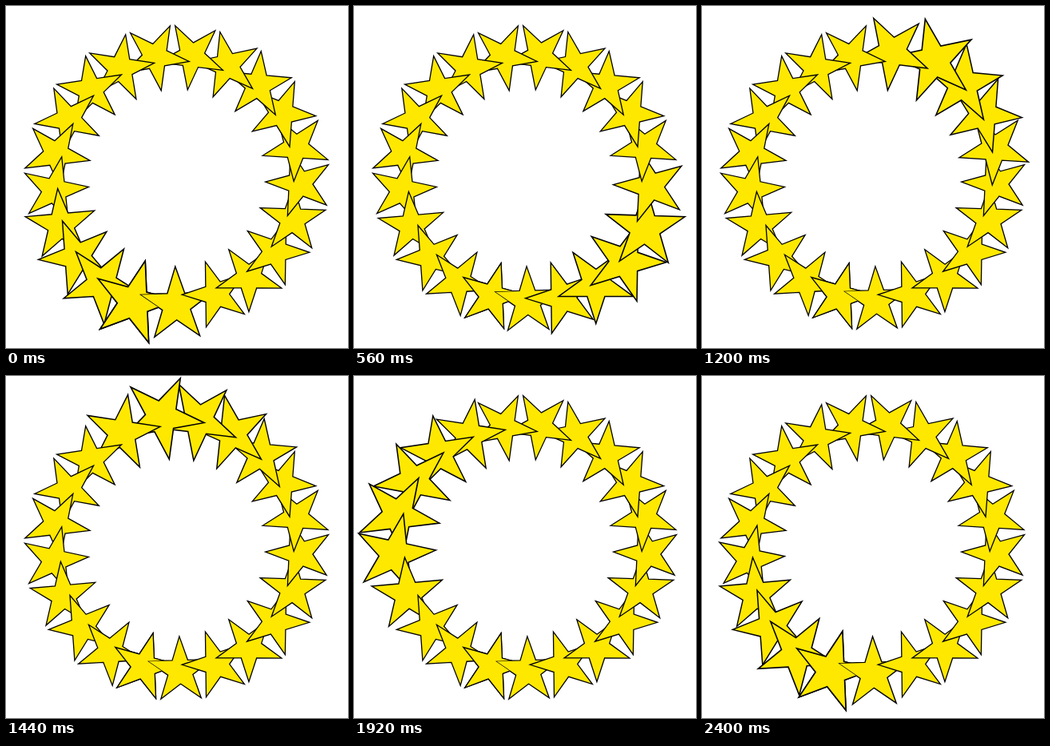
Write an HTML page with a canvas that moves like this. It is 428 px wide and 428 px high and loops after 2440 ms.

```html
<!DOCTYPE html>
<html lang="en">
<head>
<meta charset="utf-8">
<title>Star ring</title>
<style>
  html, body { margin: 0; width: 100%; height: 100%; overflow: hidden; background: #fff; }
  canvas { display: block; }
</style>
</head>
<body>
<canvas id="stage" width="428" height="428"></canvas>
<script>
const ctx = document.getElementById('stage').getContext('2d');
const SIZE = 428, LOOP = 2440, STEP = 40, COUNT = 21;
const CENTER = { x: 213.8, y: 215 };
const RING = 153.9, RADIUS = 43, INNER = RADIUS * 0.382;
const HALF_WIDTH = RADIUS * Math.sin(Math.PI * 0.4);
const GROWTH = 0.25, RISE = 240, FALL = 480;

const star = new Path2D();
for (let i = 0; i < 10; i++) {
  const angle = -Math.PI / 2 + i * Math.PI / 5;
  const r = i % 2 ? INNER : RADIUS;
  star.lineTo(r * Math.cos(angle), r * Math.sin(angle));
}
star.closePath();

// The pulse travels three steps per star and hurries a little near the end.
function startTime(k) {
  const lead = k > 15 ? 2 : k === 15 ? 1 : 0;
  return (3 * (k - 1) - lead) * STEP;
}

function scaleAt(k, time) {
  const age = (time - startTime(k) + LOOP) % LOOP;
  const pulse = Math.min(age / RISE, (RISE + FALL - age) / FALL);
  return 1 + GROWTH * Math.max(0, pulse);
}

// Each star grows from the corner of its bounding box.
function placement(k, time) {
  return new DOMMatrix()
    .translate(CENTER.x, CENTER.y)
    .rotate(-1.6 - k * 360 / COUNT)
    .translate(HALF_WIDTH, RING - RADIUS)
    .scale(scaleAt(k, time))
    .translate(-HALF_WIDTH, RADIUS);
}

function drawStar(k, time) {
  ctx.save();
  ctx.transform(...placement(k, time).toFloat64Array().filter((_, i) => [0, 1, 4, 5, 12, 13].includes(i)));
  ctx.fill(star);
  ctx.stroke(star);
  ctx.restore();
}

function draw(now) {
  const time = Math.floor((now % LOOP) / STEP) * STEP;
  const last = COUNT - 1;
  ctx.fillStyle = '#fff';
  ctx.fillRect(0, 0, SIZE, SIZE);
  ctx.fillStyle = '#ffe800';
  ctx.strokeStyle = '#000';
  ctx.lineWidth = 1.3;

  // Closed overlap: the last star lies under the first but over its other neighbour.
  drawStar(last, time);
  for (let k = 0; k < last; k++) drawStar(k, time);
  const outside = new Path2D();
  outside.rect(0, 0, SIZE, SIZE);
  outside.addPath(star, placement(0, time));
  ctx.save();
  ctx.clip(outside, 'evenodd');
  drawStar(last, time);
  ctx.restore();
}

let begin;
function tick(now) {
  begin ??= now;
  draw(now - begin);
  requestAnimationFrame(tick);
}
requestAnimationFrame(tick);
</script>
</body>
</html>
```
